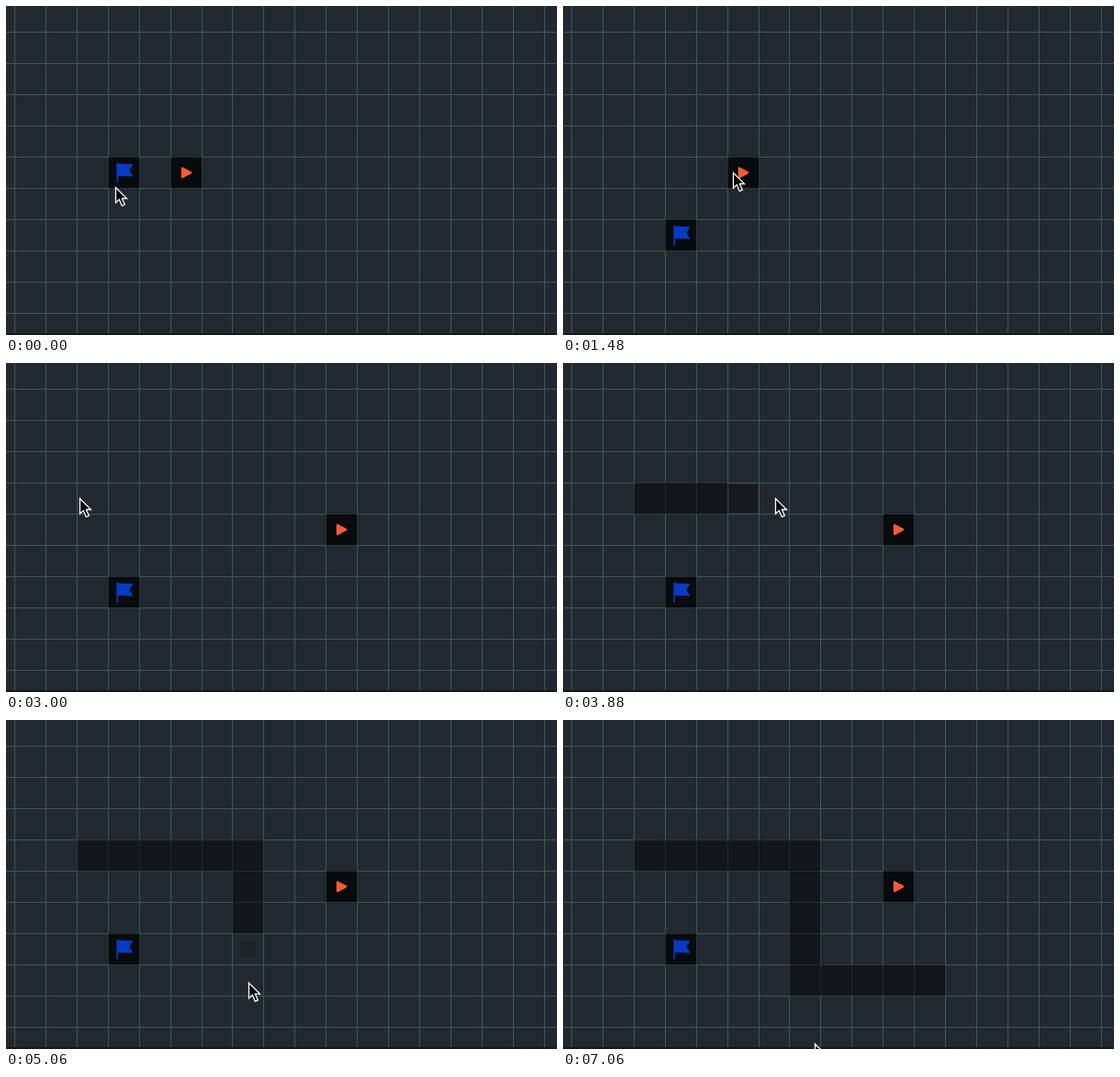
Write an HTML page with a canvas that moves like this. It is 600 px wide and 358 px high and loops after 7090 ms.

```html
<!DOCTYPE html>
<html lang="en">
<head>
<meta charset="utf-8">
<title>Grid editor</title>
<style>
  html, body { margin: 0; height: 100%; overflow: hidden; background: #22282f; }
  canvas { display: block; }
</style>
</head>
<body>
<canvas id="stage" width="600" height="358"></canvas>
<script>
const ctx = document.getElementById('stage').getContext('2d');
const LOOP = 7090, STEP = 33.95, LEFT = 8.8, TOP = 28;

const clamp = (v, min, max) => Math.max(min, Math.min(v, max));
const ease = u => { u = clamp(u, 0, 1); return u * u * (3 - 2 * u); };

// Eased pointer moves; between them the pointer rests
const home = { x: 119, y: 197 };
const moves = [
  { from: 0, to: 830, x: 115, y: 266.5 },     // drag the flag down
  { from: 830, to: 1460, x: 185, y: 181 },
  { from: 1730, to: 2095, x: 361, y: 173 },   // drag the arrow right
  { from: 2095, to: 2430, x: 361, y: 166 },
  { from: 2450, to: 3000, x: 80, y: 147 },
  { from: 3150, to: 4150, x: 264, y: 147 },   // paint walls
  { from: 4150, to: 4915, x: 264, y: 230 },
  { from: 4915, to: 5080, x: 264, y: 288 },
  { from: 5330, to: 6200, x: 391, y: 292 },
  { from: 6500, to: 6760, x: 380, y: 291 },
  { from: 6780, to: 7060, x: 274, y: 352 }
];

function pointer(t) {
  let { x, y } = home;
  for (const move of moves) {
    const u = ease((t - move.from) / (move.to - move.from));
    x += (move.x - x) * u;
    y += (move.y - y) * u;
  }
  return { x, y };
}

function cellAt(t) {
  const { x, y } = pointer(t);
  return [Math.floor((x - LEFT) / STEP), Math.floor((y - TOP) / STEP)];
}

const colX = col => Math.round(LEFT + col * STEP);
const rowY = row => Math.round(TOP + row * STEP);
const dragged = (t, start, end) => cellAt(clamp(t - 20, start, end));

// Each wall starts when the pointer first enters its cell
const walls = new Map();
for (let t = 3150; t < 6600; t += 5) {
  const cell = cellAt(t), key = cell.join();
  if (!walls.has(key)) walls.set(key, { cell, start: t });
}

function polygon(...points) {
  ctx.beginPath();
  points.forEach(([x, y]) => ctx.lineTo(x, y));
  ctx.closePath();
  ctx.fill();
}

function drawGrid() {
  ctx.fillStyle = '#22282f';
  ctx.fillRect(0, 0, 600, 358);
  ctx.fillStyle = '#3c5758';
  for (let col = 0; col < 18; col++) ctx.fillRect(colX(col), 0, 1, 358);
  for (let row = 0; row < 10; row++) ctx.fillRect(0, rowY(row), 600, 1);
  ctx.fillStyle = '#15191c';
  ctx.fillRect(0, 356, 600, 2);
}

function fillCell([col, row], color, scale = 1) {
  const x = colX(col), y = rowY(row), w = colX(col + 1) - x, h = rowY(row + 1) - y;
  const inset = (1 - scale) / 2;
  ctx.fillStyle = color;
  ctx.fillRect(x + 0.4 + w * inset, y + 0.4 + h * inset, w * scale, h * scale);
}

function drawWall({ cell, start }, t) {
  const scale = ease((t - start) / 250);
  fillCell(cell, `rgba(16,19,22,${0.82 * scale * scale})`, scale);
}

function drawMarker(cell, icon) {
  fillCell(cell, 'rgba(5,7,9,.88)');
  ctx.save();
  ctx.translate(colX(cell[0]), rowY(cell[1]));
  icon();
  ctx.restore();
}

function flag() {
  ctx.fillStyle = '#073bc4';
  ctx.fillRect(9.4, 6.6, 1.6, 21.8);
  polygon([10, 7.6], [27.5, 8.2], [23.4, 14.8], [27.5, 21.4], [10, 21]);
}

function arrow() {
  ctx.fillStyle = ctx.strokeStyle = '#fa5c34';
  ctx.lineWidth = 2.4;
  ctx.lineJoin = 'round';
  polygon([13, 12.5], [22.2, 17.3], [13, 22.1]);
  ctx.stroke();
}

function drawPointer({ x, y }) {
  ctx.save();
  ctx.translate(x + 0.5, y + 0.5);
  ctx.fillStyle = '#000';
  ctx.strokeStyle = '#fff';
  ctx.lineWidth = 1.3;
  ctx.lineJoin = 'miter';
  polygon([0, 0], [0, 16.5], [3.8, 13], [6.8, 20], [9.8, 18.7], [6.9, 12], [12, 12]);
  ctx.stroke();
  ctx.restore();
}

function draw(now) {
  const t = now % LOOP;
  drawGrid();
  walls.forEach(wall => drawWall(wall, t));
  drawMarker(dragged(t, 0, 1000), flag);
  drawMarker(dragged(t, 1730, 2400), arrow);
  drawPointer(pointer(t));
}

let origin;
function tick(now) {
  origin ??= now;
  draw(now - origin);
  requestAnimationFrame(tick);
}
draw(0);
requestAnimationFrame(tick);
</script>
</body>
</html>
```
